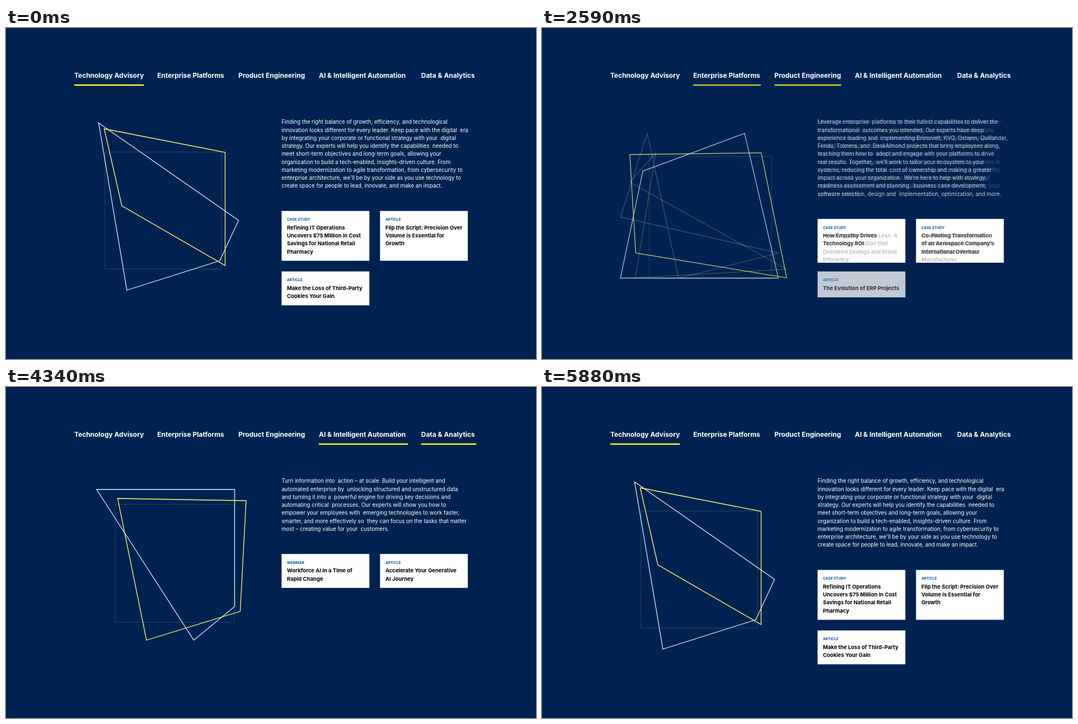
An HTML page with a canvas that plays this animation: 947x591 px, repeating every 6720 ms.

```html
<!DOCTYPE html>
<html lang="en">
<head>
<meta charset="utf-8">
<title>Services tabs</title>
<style>
  html, body { margin: 0; width: 100%; height: 100%; overflow: hidden; background: #002250; }
  canvas { display: block; width: 100%; height: 100%; }
</style>
</head>
<body>
<canvas id="stage"></canvas>
<script>
const W = 947, H = 591, LOOP = 6720, STEP = 70;
const FADE = 325, HOVER = 300, LEADING = 14.25;
const FONT = 'Inter, "Open Sans", sans-serif';
const LEFT = 492.4, CARD_W = 156.9, COLUMN = 175.9;

const tabs = [
  { name: 'Technology Advisory', x: 122, end: 246.3 },
  { name: 'Enterprise Platforms', x: 270.2, end: 391 },
  { name: 'Product Engineering', x: 415.2, end: 534.8 },
  { name: 'AI & Intelligent Automation', x: 559, end: 718.2 },
  { name: 'Data & Analytics', x: 741.8, end: 840.3 }
];

// Each step: the pointer reaches the next tab, then clicks it.
const steps = [
  { hover: 1160, click: 1350 },
  { hover: 1840, click: 2540 },
  { hover: 2980, click: 3563 },
  { hover: 4030, click: 4500 },
  { hover: 5080, click: 5510 }
];

const panels = [
  {
    pale: [[165.5, 169.5], [415.5, 343.5], [382, 415.5], [216, 468]],
    yellow: [[175.5, 180], [391.5, 222], [391.5, 424], [207, 317.5]],
    square: [[177, 221.5], [385, 430.5]],
    text: `Finding the right balance of growth, efficiency, and technological
innovation looks different for every leader. Keep pace with the digital  era
by integrating your corporate or functional strategy with your  digital
strategy. Our experts will help you identify the capabilities  needed to
meet short-term objectives and long-term goals, allowing your
organization to build a tech-enabled, insights-driven culture. From
marketing modernization to agile transformation, from cybersecurity to
enterprise architecture, we'll be by your side as you use technology to
create space for people to lead, innovate, and make an impact.`,
    cards: [
      ['CASE STUDY', 'Refining IT Operations', 'Uncovers $75 Million in Cost', 'Savings for National Retail', 'Pharmacy'],
      ['ARTICLE', 'Flip the Script: Precision Over', 'Volume is Essential for', 'Growth'],
      ['ARTICLE', 'Make the Loss of Third-Party', 'Cookies Your Gain']
    ]
  },
  {
    pale: [[361.5, 193], [422.5, 436], [137, 436], [177.5, 256.5]],
    yellow: [[156.5, 238.5], [389, 235.5], [434, 444.5], [167, 403]],
    square: [[186.5, 230], [406.5, 449.5]],
    text: `Leverage enterprise  platforms to their fullest capabilities to deliver the
transformational  outcomes you intended. Our experts have deep
experience leading and  implementing Brimovelt, KVQ, Ostwen, Quillandar,
Fendu, Tolmera, and  DeskAlmond projects that bring employees along,
teaching them how to  adopt and engage with your platforms to drive
real results. Together,  we’ll work to tailor your ecosystem to your
systems, reducing the total  cost of ownership and making a greater
impact across your organization.  We’re here to help with strategy,
readiness assessment and planning,  business case development,
software selection, design and  implementation, optimization, and more.`,
    cards: [
      ['CASE STUDY', 'How Empathy Drives', 'Technology ROI'],
      ['CASE STUDY', 'Co-Piloting Transformation', 'of an Aerospace Company’s', 'International Overhaul'],
      ['ARTICLE', 'The Evolution of ERP Projects']
    ]
  },
  {
    pale: [[196, 172.5], [150, 350], [421.5, 426.5], [250, 479.5]],
    yellow: [[206, 183], [158, 246], [447, 432.5], [168, 451]],
    square: [[208.5, 226.5], [422, 441]],
    text: `Move your ideas from  concept to product. Our cross-functional team —
including experts in  software engineering, artificial intelligence, data,
and architecture —  takes a streamlined approach to helping you build
scalable, optimized  experiences. You'll get outcome-focused, end-to-
end solutions with the  ideal performance you need to boost your
competitive advantage.  Together, we’ll start with business outcomes in
mind, activate quickly  through rapid design sprints, maximize flexibility
and costs with a  cloud-native architecture, leverage leading AI and
cybersecurity best  practices, and use proven methods to improve your
speed to market.`,
    cards: [
      ['CASE STUDY', 'Achieving More With Less: A', 'Technology Solution that', 'Delivered Savings and Drove', 'Efficiency'],
      ['CASE STUDY', 'Customer Sentiment and', 'Insights Analysis Delivered', '5X ROI for a Software', 'Manufacturer']
    ]
  },
  {
    pale: [[162, 183], [408.5, 183], [408.5, 392], [335.5, 452]],
    yellow: [[199.5, 199], [429, 203], [418.5, 400.5], [251, 452]],
    square: [[195, 209.5], [408, 420]],
    text: `Turn information into  action – at scale. Build your intelligent and
automated enterprise by  unlocking structured and unstructured data
and turning it into a  powerful engine for driving key decisions and
automating critical  processes. Our experts will show you how to
empower your employees with  emerging technologies to work faster,
smarter, and more effectively so  they can focus on the tasks that matter
most – creating value for your  customers.`,
    cards: [
      ['WEBINAR', 'Workforce AI in a Time of', 'Rapid Change'],
      ['ARTICLE', 'Accelerate Your Generative', 'AI Journey']
    ]
  },
  {
    pale: [[147.5, 195], [425, 245], [388.5, 199.5], [270, 466]],
    yellow: [[166.5, 212.5], [422, 261], [385, 459], [288.5, 475]],
    square: [[179.5, 238.5], [390, 448]],
    text: `Learn how to unlock  value through data with a product-oriented
framework. Our executives  will help you work across the end-to-end
Information supply chain to  build the vision, tools, management
process, and culture you need to  lead. You'll discover how treating your
data as a product enhances  decision-making and creates
opportunities for growth, profitability, and  operational excellence. By
learning how to convert data to insights —  then insights to outcomes —
you can unlock your organization's shared  potential.`,
    cards: [
      ['ARTICLE', 'The Data & Analytics Supply', 'Chain'],
      ['ARTICLE', 'Governance: Your Secret', 'Sauce for a Well-Run Data &', 'Analytics Program'],
      ['ARTICLE', 'From Cost Center to Revenue', 'Center: Transforming Data &', 'Analytics with a Product-']
    ]
  }
];

const canvas = document.getElementById('stage');
const ctx = canvas.getContext('2d');
const lerp = (a, b, p) => a + (b - a) * p;
const over = (a, b) => 1 - (1 - a) * (1 - b);

// cubic-bezier(0, 0, .58, 1)
function easeOut(x) {
  x = Math.min(1, Math.max(0, x));
  let lo = 0, hi = 1;
  for (let i = 0; i < 24; i++) {
    const s = (lo + hi) / 2;
    if (1.74 * s * s * (1 - s) + s ** 3 < x) lo = s; else hi = s;
  }
  return hi * hi * (3 - 2 * hi);
}

const cardHeight = lines => 32 + LEADING * lines;

function layOut(panel) {
  panel.lines = panel.text.split('\n');
  const top = 198.4 + LEADING * panel.lines.length;
  const rowHeight = cardHeight(Math.max(panel.cards[0].length, panel.cards[1].length) - 1);
  panel.cards = panel.cards.map(([label, ...title], i) => ({
    label, title,
    x: LEFT + (i === 1 ? COLUMN : 0),
    y: i < 2 ? top : top + rowHeight + 19,
    h: i < 2 ? rowHeight : cardHeight(title.length)
  }));
}
panels.forEach(layOut);

function bounds(points) {
  const xs = points.map(q => q[0]), ys = points.map(q => q[1]);
  return [Math.min(...xs), Math.min(...ys), Math.max(...xs), Math.max(...ys)];
}

function outline(points, box, color, alpha) {
  const [x0, y0, x1, y1] = bounds(points);
  ctx.beginPath();
  for (const [x, y] of points) {
    ctx.lineTo(lerp(box[0], box[2], (x - x0) / (x1 - x0)),
               lerp(box[1], box[3], (y - y0) / (y1 - y0)));
  }
  ctx.closePath();
  ctx.globalAlpha = alpha;
  ctx.strokeStyle = color;
  ctx.stroke();
}

function write(lines, x, y, font, color, alpha) {
  ctx.globalAlpha = alpha;
  ctx.font = `${font} ${FONT}`;
  ctx.fillStyle = color;
  lines.forEach((line, i) => ctx.fillText(line, x, y + i * LEADING));
}

function drawTabs(from, to, hover, p) {
  tabs.forEach((tab, i) => {
    write([tab.name], tab.x, 89.2, '700 11.95px', '#fff', 1);
    ctx.globalAlpha = i === from ? 1 - p : i === to ? over(hover * (1 - p), p) : 0;
    ctx.fillStyle = '#fff62a';
    ctx.fillRect(tab.x, 100.7, tab.end - tab.x, 2.5);
  });
}

function drawShapes(a, b, p) {
  const between = key => {
    const end = bounds(b[key]);
    return bounds(a[key]).map((v, i) => lerp(v, end[i], p));
  };
  const [x0, y0, x1, y1] = between('square');
  ctx.globalAlpha = 1;
  ctx.lineWidth = 1;
  ctx.strokeStyle = 'rgba(170,190,180,.22)';
  ctx.strokeRect(x0, y0, x1 - x0, y1 - y0);
  ctx.lineWidth = 1.3;
  for (const [key, color] of [['pale', '#d4f4f8'], ['yellow', '#fffa6c']]) {
    const box = between(key);
    outline(a[key], box, color, 1 - p);
    outline(b[key], box, color, p);
  }
}

function drawCard(a, b, p) {
  const start = a || b, end = b || a;
  const y = lerp(start.y, end.y, p), x = start.x;
  ctx.globalAlpha = a && b ? 1 : a ? 1 - p : p;
  ctx.fillStyle = '#fff';
  ctx.fillRect(x, y, CARD_W, lerp(start.h, end.h, p));
  const sameLabel = a && b && a.label === b.label;
  for (const [card, alpha] of [[a, 1 - p], [b, p]]) {
    if (!card) continue;
    const labelAlpha = sameLabel ? (card === b ? 1 : 0) : alpha;
    write([card.label], x + 9.6, y + 17.6, '700 6.5px', '#0055a6', labelAlpha);
    write(card.title, x + 9.6, y + 33.2, '700 9.5px', '#000', alpha);
  }
}

function draw(time) {
  const t = Math.floor(time % LOOP / STEP) * STEP;
  const from = Math.max(0, steps.filter(s => s.hover <= t).length - 1);
  const to = (from + 1) % panels.length;
  const hover = easeOut((t - steps[from].hover) / HOVER);
  const p = easeOut((t - steps[from].click) / FADE);
  const a = panels[from], b = panels[to];

  ctx.setTransform(canvas.width / W, 0, 0, canvas.height / H, 0, 0);
  ctx.globalAlpha = 1;
  ctx.fillStyle = '#002250';
  ctx.fillRect(0, 0, W, H);
  ctx.fillStyle = '#0a1b33';
  ctx.fillRect(0, 0, W, 1);

  drawTabs(from, to, hover, p);
  drawShapes(a, b, p);
  write(a.lines, LEFT, 171.3, '400 9.68px', '#fff', 1 - p);
  write(b.lines, LEFT, 171.3, '400 9.68px', '#fff', p);
  for (let i = 0; i < 3; i++) {
    if (a.cards[i] || b.cards[i]) drawCard(a.cards[i], b.cards[i], p);
  }
}

const density = window.devicePixelRatio || 1;
canvas.width = Math.round(W * density);
canvas.height = Math.round(H * density);

const began = performance.now();
function tick() {
  draw(performance.now() - began);
  requestAnimationFrame(tick);
}
tick();
</script>
</body>
</html>
```
